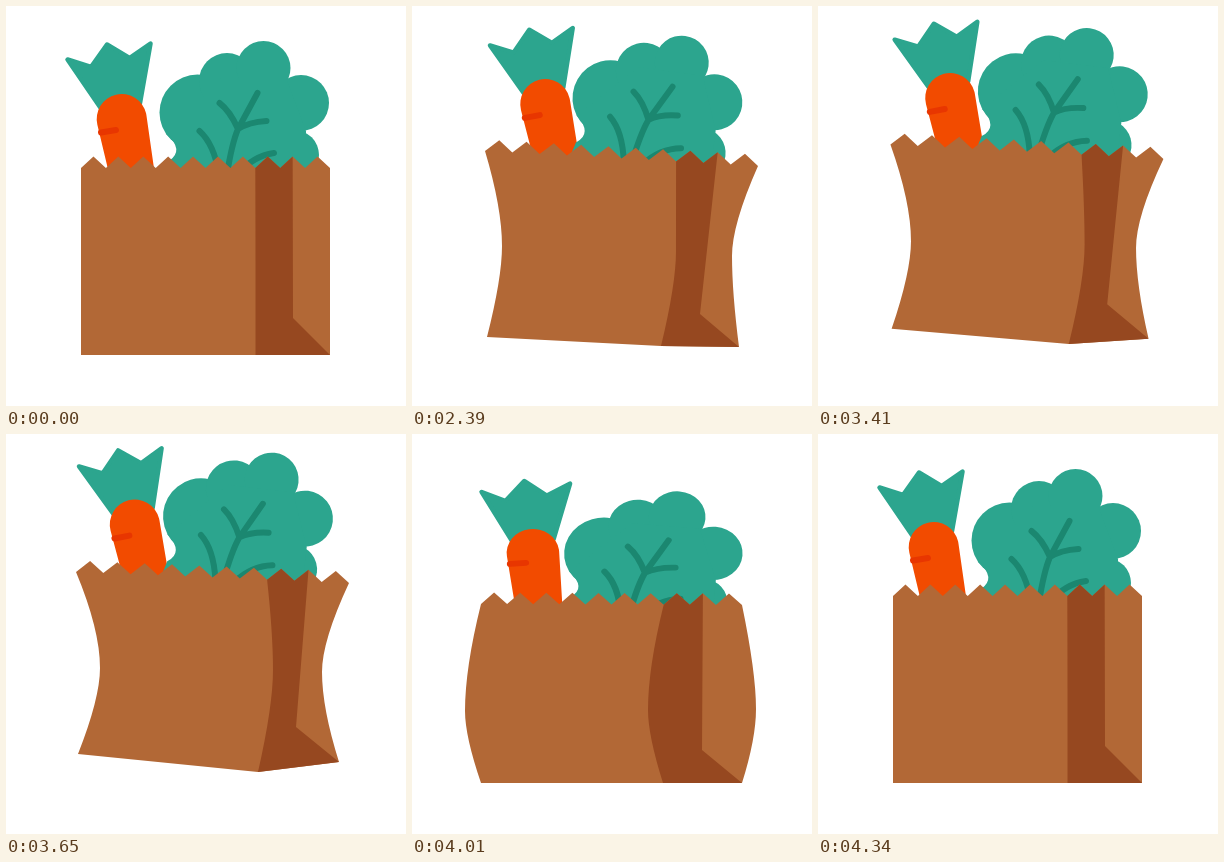
Recreate the animation shown at these times as an HTML page with a canvas. Size 400 by 400 pixels, loop 4.37 s.

```html
<!DOCTYPE html>
<html>
<head>
<meta charset="utf-8">
<style>
  html, body { margin: 0; height: 100%; overflow: hidden; background: #fff; }
  canvas { display: block; width: 100vw; height: 100vh; }
</style>
</head>
<body>
<canvas width="400" height="400"></canvas>
<script>
const ctx = document.querySelector('canvas').getContext('2d');
const LOOP = 4370, START = 2030, STEP = 30;
const TEAL = '#2ca58e', VEIN = '#1b8770', ORANGE = '#f24b00', MARK = '#e83600';
const PAPER = '#b26836', SHADE = '#964820';

// top: left and right corner; bottom: left, crease, right; waist: left, right, crease x;
// carrot and leaf: dx, dy, degrees; body: squash, lift
const rest = {
  top: [75, 162, 324, 162], bottom: [75, 349, 249.5, 349, 324, 349],
  waist: [75, 262, 324, 247, 249.5], fold: [287, 312],
  carrot: [0, 0, 0], leaf: [0, 0, 0], body: [1, 0]
};
const flare = { ...rest, top: [73, 162, 326, 162], waist: [77, 262, 322, 247, 250] };
const rise = {
  top: [73, 145, 346, 160], bottom: [75, 331, 249, 340, 327, 341],
  waist: [90, 240, 320, 250, 264], fold: [288, 308],
  carrot: [17.5, -15, -1], leaf: [7.5, -9, 7.5], body: [1, 0]
};
const hover = {
  top: [76, 139.5, 349, 159], bottom: [76, 327, 249, 338, 327, 340],
  waist: [91.5, 237, 321, 248, 266], fold: [288, 306],
  carrot: [21.5, -19, -1], leaf: [11, -11.5, 7.5], body: [1, 0]
};
const tilt = {
  top: [70, 138, 343, 149], bottom: [72, 320, 252, 338, 333, 328],
  waist: [94, 234, 316, 238, 267], fold: [290, 293],
  carrot: [13, -22.5, -1.5], leaf: [4, -19.5, 6.5], body: [1, 0]
};
const apex = { ...tilt, body: [1, 7] };
const land = { ...rest, top: [73, 157, 327, 158], carrot: [5, -5, 2], leaf: [3, -4, 5] };
const squash = {
  top: [69, 170, 330, 171], bottom: [69, 349, 251, 349, 330, 349],
  waist: [53, 277, 344, 275, 236], fold: [290, 316],
  carrot: [5.5, 6, 5], leaf: [3, 17, 5], body: [1.05, 0]
};
const settle = { ...rest, carrot: [0, -3, 0], leaf: [0, -2, 0] };

const keys = [
  [2000, rest], [2030, flare], [2390, rise], [2870, hover], [3100, hover], [3650, tilt],
  [3740, apex], [3920, land], [4010, squash], [4180, settle], [4340, rest]
];

// Monotone cubic interpolation of one value
function valueAt(t, i, get) {
  const slope = k => k < 0 || k > keys.length - 2 ? 0
    : (get(keys[k + 1][1]) - get(keys[k][1])) / (keys[k + 1][0] - keys[k][0]);
  const tangent = k => {
    const a = slope(k - 1), b = slope(k);
    return a * b > 0 ? 2 * a * b / (a + b) : 0;
  };
  const [t0, p0] = keys[i], [t1, p1] = keys[i + 1];
  const d = t1 - t0, u = (t - t0) / d, s = u * u * (3 - 2 * u);
  return get(p0) * (1 - s) + get(p1) * s
    + d * u * (1 - u) * ((1 - u) * tangent(i) - u * tangent(i + 1));
}

function poseAt(t) {
  if (t < keys[0][0] || t >= keys.at(-1)[0]) return rest;
  const i = keys.findIndex((k, n) => t < keys[n + 1][0]);
  const pose = {};
  for (const part in rest) {
    pose[part] = rest[part].map((_, n) => valueAt(t, i, p => p[part][n]));
  }
  return pose;
}

function fill(color, trace) {
  ctx.fillStyle = color;
  ctx.beginPath();
  trace();
  ctx.fill();
}

function line(color, width, path) {
  ctx.strokeStyle = color;
  ctx.lineWidth = width;
  ctx.stroke(new Path2D(path));
}

function place([dx, dy, deg], stretch, px, py, draw) {
  ctx.save();
  ctx.translate(px + dx, py + dy);
  ctx.scale(stretch, 1 / stretch);
  ctx.rotate(deg * Math.PI / 180);
  ctx.translate(-px, -py);
  draw();
  ctx.restore();
}

function drawCarrot() {
  const greens = 'M61.5 53.5L85 61L101 38.5L123.500 52L144.500 37.500L134 97L96 104Z';
  ctx.fillStyle = TEAL;
  ctx.fill(new Path2D(greens));
  line(TEAL, 4.5, greens);
  fill(ORANGE, () => {
    ctx.moveTo(106, 180);
    ctx.arc(115.7, 113, 25, Math.PI - 0.23, -0.14);
    ctx.lineTo(150.5, 180);
  });
  line(MARK, 6, 'M95 126.500L110 124');
}

function drawLeaf() {
  const lobes = [[191.5, 106.5, 38], [221, 75, 28], [257.5, 62, 27], [295, 97, 28], [288, 149, 25]];
  for (const [x, y, r] of lobes) fill(TEAL, () => ctx.arc(x, y, r, 0, 7));
  ctx.fill(new Path2D('M160 128Q179 144 163 155L155 185H300V125L280 72H215Z'));
  line(VEIN, 6, 'M251.500 87L232 123Q226 137 221 168M213.500 97Q224 105 232 123Q243 116 260.500 115'
    + 'M193.500 125Q208 138 213 168M268 147Q247 150 232 168');
}

function drawBag({ top: [lx, ly, rx, ry], bottom: [blx, bly, cx, cy, brx, bry],
                   waist: [wlx, wly, wrx, wry, wcx], fold }) {
  const len = Math.hypot(rx - lx, ry - ly);
  const edge = i => {
    const h = i % 2 ? 11.5 : 0, u = i / 20;
    return [lx + (rx - lx) * u + h * (ry - ly) / len, ly + (ry - ly) * u - h * (rx - lx) / len];
  };
  const teeth = (from, to) => {
    for (let i = from; i <= to; i++) ctx.lineTo(...edge(i));
  };
  // Side curve that is vertical at the waist
  const side = (x0, y0, wx, wy, x1, y1) => {
    ctx.lineTo(x0, y0);
    ctx.quadraticCurveTo(wx, wy + (y0 - wy) * 0.35, wx, wy);
    ctx.quadraticCurveTo(wx, wy + (y1 - wy) * 0.4, x1, y1);
  };
  fill(PAPER, () => {
    teeth(0, 20);
    side(rx, ry, wrx, wry, brx, bry);
    ctx.lineTo(cx, cy);
    side(blx, bly, wlx, wly, lx, ly);
  });
  fill(SHADE, () => {
    teeth(14, 17);
    ctx.lineTo(...fold);
    ctx.lineTo(brx, bry);
    side(cx, cy, wcx, (wly + wry) / 2, ...edge(14));
  });
}

function frame(now) {
  const t = now % LOOP;
  const pose = poseAt(START + Math.floor((t - START) / STEP) * STEP);
  const [stretch, lift] = pose.body;
  ctx.clearRect(0, 0, 400, 400);
  ctx.lineCap = ctx.lineJoin = 'round';
  ctx.save();
  ctx.translate(0, -lift);
  place(pose.carrot, stretch, 116, 110, drawCarrot);
  place(pose.leaf, stretch, 232, 100, drawLeaf);
  drawBag(pose);
  ctx.restore();
  requestAnimationFrame(frame);
}
requestAnimationFrame(frame);
</script>
</body>
</html>
```
